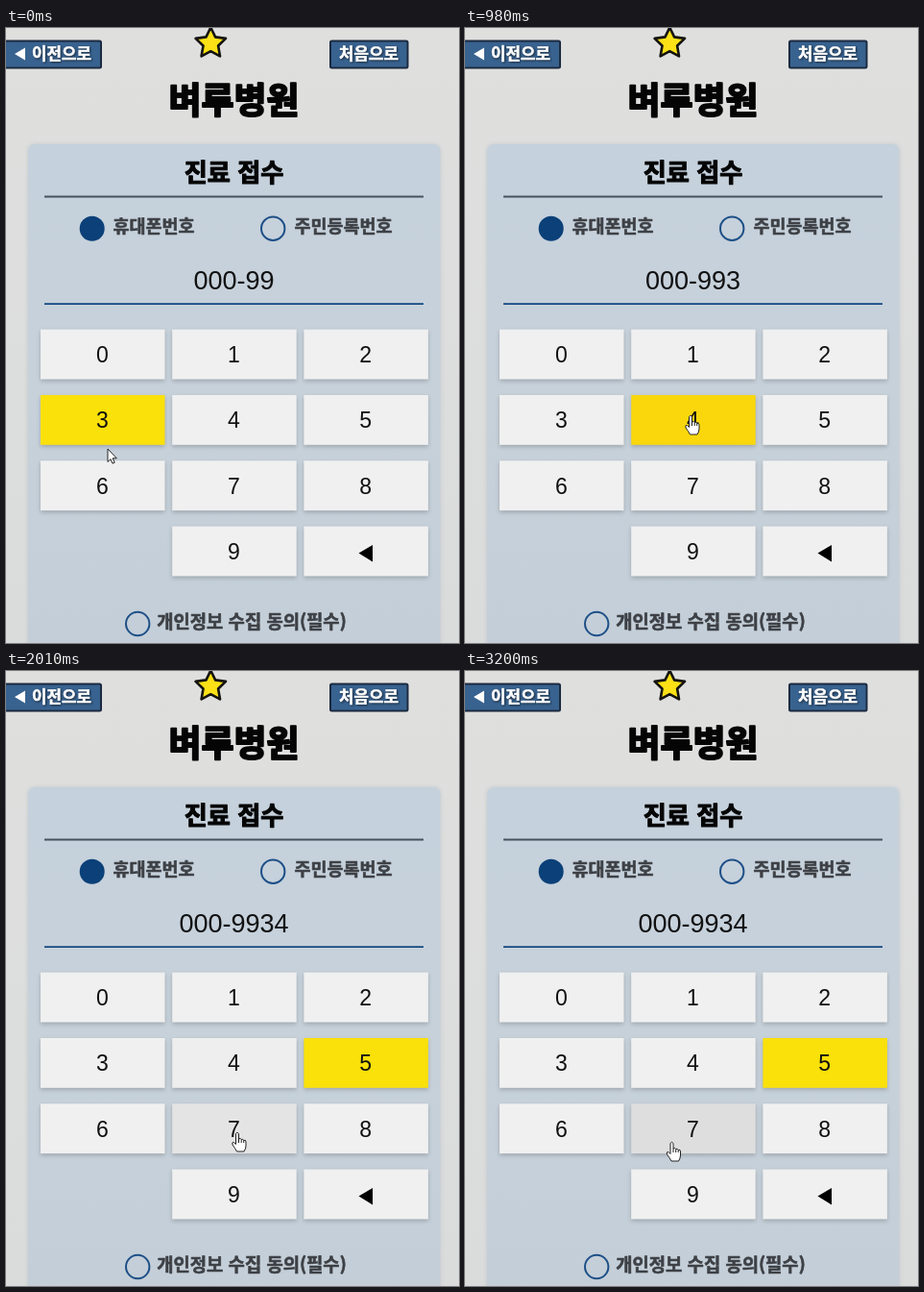
An HTML page that plays this animation: 472x640 px, repeating every 3.26 s.

```html
<!DOCTYPE html>
<html lang="ko">
<head>
<meta charset="utf-8">
<style>
  html, body { margin: 0; width: 100%; height: 100%; overflow: hidden; background: #dcdddc; }
  svg { display: block; width: 472px; height: 640px; }
  text { font-family: "Noto Sans CJK KR", "Noto Sans CJK", sans-serif; font-weight: 900;
    text-anchor: middle; paint-order: stroke; stroke-linejoin: round; }
  .num { font-family: "Liberation Sans", Arial, sans-serif; font-weight: 400; fill: #111; }
  .head { fill: #050505; stroke: #050505; }
  .label { fill: #3d4045; stroke: #3d4045; stroke-width: .6px; }
  .nav { fill: #fff; stroke: #fff; stroke-width: .6px; font-size: 16.8px; filter: drop-shadow(1px 1px 1px #0009); }
  .ring { fill: none; stroke: #1d4f87; stroke-width: 2; }
  .key { filter: drop-shadow(0 2px 2px #0003); }
</style>
</head>
<body>
<svg viewBox="0 0 472 640">
  <defs>
    <linearGradient id="wall" x2="0" y2="1">
      <stop stop-color="#dfdfde"/><stop offset="1" stop-color="#dadcdc"/>
    </linearGradient>
    <linearGradient id="sheet" x2="0" y2="1">
      <stop stop-color="#c5d1dc"/><stop offset=".5" stop-color="#c7d1da"/><stop offset="1" stop-color="#c3ced8"/>
    </linearGradient>
  </defs>
  <rect width="472" height="640" fill="url(#wall)"/>
  <rect x="23" y="121" width="429.5" height="540" rx="7" fill="url(#sheet)" style="filter:drop-shadow(0 0 2px #8c9cab55)"/>

  <g fill="#38628f" stroke="#1b2a40" stroke-width="2">
    <rect x="-2" y="13.5" width="101" height="28" rx="1.5"/>
    <rect x="338" y="13.5" width="80.500" height="28" rx="1.5"/>
  </g>
  <path d="M9 27L20 20.5V33.5Z" fill="#fff"/>
  <text class="nav" x="58" y="32.5">이전으로</text>
  <text class="nav" x="378" y="32.5">처음으로</text>
  <path id="star" fill="#fbe116" stroke="#141310" stroke-width="2.6" stroke-linejoin="round"/>

  <text class="head" x="237.5" y="89" font-size="37" stroke-width="2">벼루병원</text>
  <text class="head" x="237.5" y="159.5" font-size="26.2" stroke-width="1.1">진료 접수</text>
  <path d="M40 175.500H435" stroke="#46525e" stroke-width="2"/>
  <circle cx="89.700" cy="208.700" r="13" fill="#0b4078"/>
  <text class="label" x="154" y="213" font-size="18.5">휴대폰번호</text>
  <circle class="ring" cx="278.2" cy="208.700" r="12.2"/>
  <text class="label" x="351.5" y="213" font-size="18.5">주민등록번호</text>
  <text id="entry" class="num" x="237.5" y="272" font-size="27"></text>
  <path d="M40 287.200H435" stroke="#12487f" stroke-width="1.8"/>

  <g id="pad"></g>
  <path d="M367.500 546.500L382 538V555.500Z" fill="#000"/>
  <circle class="ring" cx="137.2" cy="620" r="12.2"/>
  <text class="label" x="256" y="624.5" font-size="18.8">개인정보 수집 동의(필수)</text>

  <g fill="#fff" stroke="#222" stroke-linejoin="round">
    <path id="arrow" d="M0 0V13.500L3 10.700L5 15.200L7.200 14.200L5.200 9.800H9.300Z"/>
    <path id="hand" d="M-1.500 10V1.500Q0-1 1.500 1.500V7Q3.500 5.500 4.200 7.500Q6 6.500 6.700 8.500Q9 7.500 9 10V14Q9 17 7 20H-.5Q-2 17-5 13Q-6 10-3.500 10.500L-1.500 12.500ZM1.500 7V11M4.200 7.500V11M6.700 8.500V11"/>
  </g>
</svg>
<script>
const LOOP = 3260, FADE = 300, KEY_W = 129.5, KEY_H = 51.8;
const PLAIN = [240, 240, 240], HOVER = [222, 222, 222], NEXT = [250, 225, 10], NEXT_HOVER = [249, 215, 12];
const $ = id => document.getElementById(id);

// Each key: start colour, then [time, colour] changes that fade in
const fades = {
  3: [NEXT, [67, NEXT_HOVER], [336, HOVER], [558, PLAIN]],
  4: [PLAIN, [336, NEXT], [582, NEXT_HOVER], [1120, HOVER], [1840, PLAIN]],
  5: [PLAIN, [1120, NEXT]],
  7: [PLAIN, [1895, HOVER]]
};
const path = [[0, 106, 438], [280, 142, 403], [440, 142, 403], [800, 235, 403],
  [1750, 235, 403], [1960, 241, 480], [2880, 241, 480], [3180, 215.5, 490]];

const keys = [];
for (let i = 0; i < 11; i++) {
  const cell = i < 9 ? i : i + 1;
  const x = 36 + cell % 3 * 137.2, y = 313.7 + Math.floor(cell / 3) * 68.3;
  keys.push({ x, y });
  $('pad').innerHTML += `<rect class="key" x="${x}" y="${y}" width="${KEY_W}" height="${KEY_H}" fill="rgb(${PLAIN})"/>` +
    (i < 10 ? `<text class="num" x="${x + 64.3}" y="${y + 34.2}" font-size="23">${i}</text>` : '');
}
const rects = document.querySelectorAll('.key');

let star = '';
for (let i = 0; i < 10; i++) {
  const r = i % 2 ? 8.2 : 16.5, a = i * Math.PI / 5;
  star += (i ? 'L' : 'M') + (213.3 + r * Math.sin(a)) + ' ' + (16 - r * Math.cos(a));
}
$('star').setAttribute('d', star + 'Z');

const mix = (a, b, p) => a + (b - a) * p;
const clamp = p => Math.max(0, Math.min(1, p));

// CSS "ease" curve
function ease(p) {
  let lo = 0, hi = 1, u = .5;
  for (let i = 0; i < 16; i++) {
    u = (lo + hi) / 2;
    if (.75 * u * (1 - u) + u ** 3 < p) lo = u; else hi = u;
  }
  return .3 * u * (1 - u) ** 2 + 3 * u * u * (1 - u) + u ** 3;
}

function keyColor([start, ...changes], t) {
  let color = start;
  for (const [at, to] of changes) {
    if (t > at) {
      const p = ease(clamp((t - at) / FADE));
      color = color.map((c, i) => mix(c, to[i], p));
    }
  }
  return `rgb(${color.map(Math.round)})`;
}

function pointer(t) {
  const n = path.findIndex(k => k[0] > t);
  if (n < 0) return path[path.length - 1].slice(1);
  const a = path[n - 1], b = path[n], p = (t - a[0]) / (b[0] - a[0]);
  const s = p * p * (3 - 2 * p);
  return [mix(a[1], b[1], s), mix(a[2], b[2], s)];
}

function draw(now) {
  const t = now % LOOP;
  for (const k in fades) rects[k].setAttribute('fill', keyColor(fades[k], t));
  $('entry').textContent = '000-99' + (t >= 336 ? '3' : '') + (t >= 1120 ? '4' : '');
  const [x, y] = pointer(t);
  const over = keys.some(k => x > k.x && x < k.x + KEY_W && y > k.y && y < k.y + KEY_H);
  for (const id of ['arrow', 'hand']) {
    $(id).setAttribute('transform', `translate(${x} ${y})`);
    $(id).setAttribute('visibility', over === (id === 'hand') ? 'visible' : 'hidden');
  }
}

const begin = performance.now();
function tick() {
  draw(performance.now() - begin);
  requestAnimationFrame(tick);
}
tick();
</script>
</body>
</html>
```
